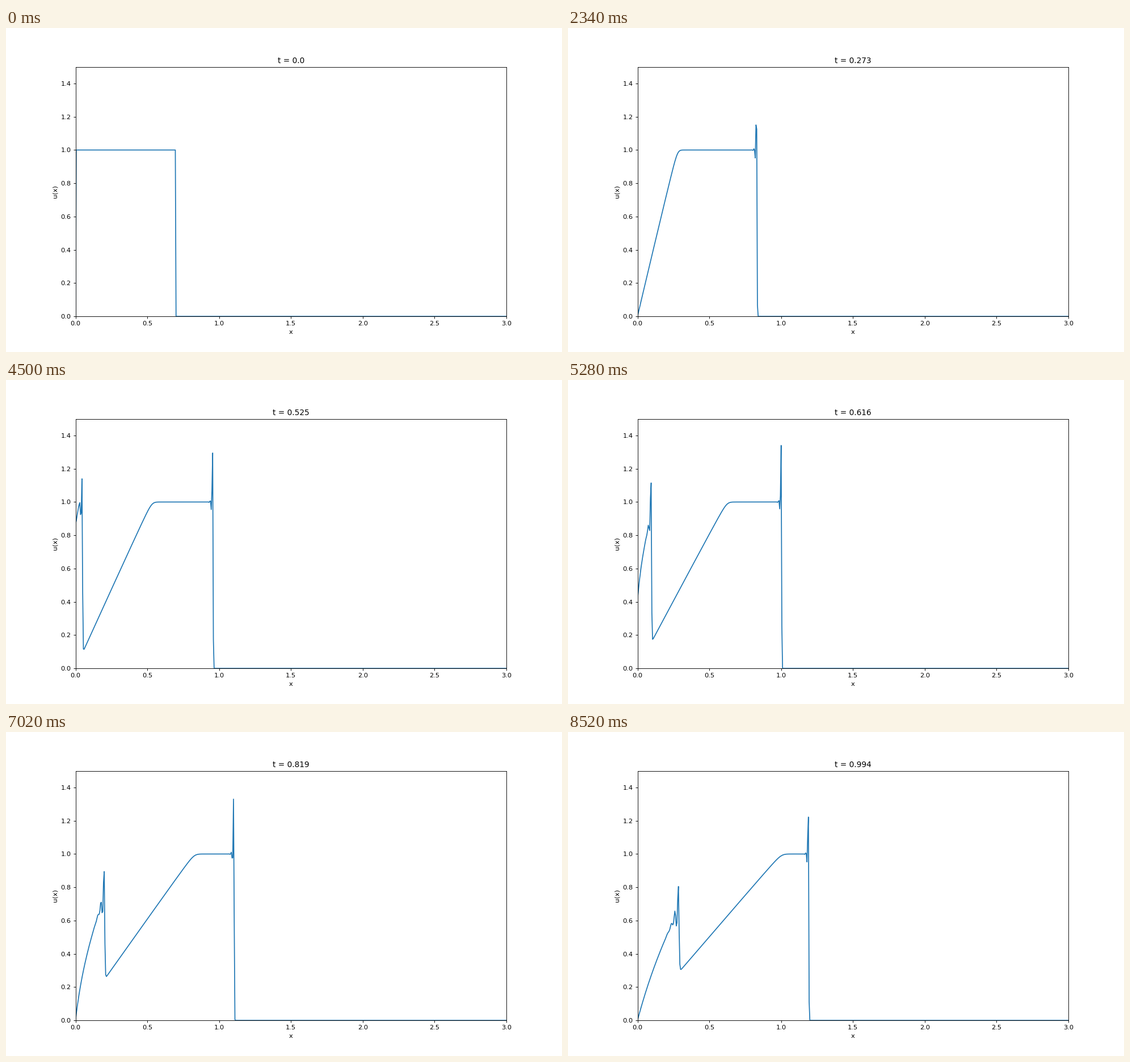
A matplotlib script that plays this animation: 980x572 px, repeating every 8.58 s.

```python
import matplotlib.pyplot as plt
import numpy as np
from matplotlib.animation import FuncAnimation

# Inviscid Burgers equation, two-step Lax-Wendroff (Richtmyer) scheme
DPI = 980 / 12
FRAMES, INTERVAL = 143, 60
CELLS, LENGTH = 600, 3.0
DX = LENGTH / CELLS
RATIO = 0.7                 # dt / dx
DT = RATIO * DX
STEPS_PER_FRAME = 2


def inflow(t):
    """Triangular pulse at the left boundary, peaking at t = 0.5."""
    return max(0.0, 1 - abs(t - 0.5) / 0.2)


def flux(u):
    return u * u / 2


def advance(u, t):
    """Step to time t, with the inflow value set before the fluxes."""
    new = u.copy()
    new[0] = inflow(t)
    half = (new[1:] + new[:-1]) / 2 - RATIO / 2 * np.diff(flux(new))
    new[1:-1] -= RATIO * np.diff(flux(half))
    return new


def solve():
    u = np.zeros(CELLS + 1)
    u[1:140] = 1
    states = [u]
    for n in range(1, (FRAMES - 1) * STEPS_PER_FRAME + 1):
        u = advance(u, n * DT)
        if n % STEPS_PER_FRAME == 0:
            states.append(u)
    return states


x = np.linspace(0, LENGTH, CELLS + 1)
states = solve()

fig, ax = plt.subplots(figsize=(12, 7.005), dpi=DPI)  # 980 x 572 px
ax.set(xlim=(0, LENGTH), ylim=(0, 1.5), xlabel="x", ylabel="u(x)")
line, = ax.plot(x, states[0])
title = ax.set_title("t = 0.0")


def draw(k):
    line.set_ydata(states[k])
    title.set_text(f"t = {round(k * STEPS_PER_FRAME * DT, 3)}")
    return line, title


anim = FuncAnimation(fig, draw, frames=FRAMES, interval=INTERVAL,
                     repeat=True, repeat_delay=0, blit=False)
plt.show()
```
